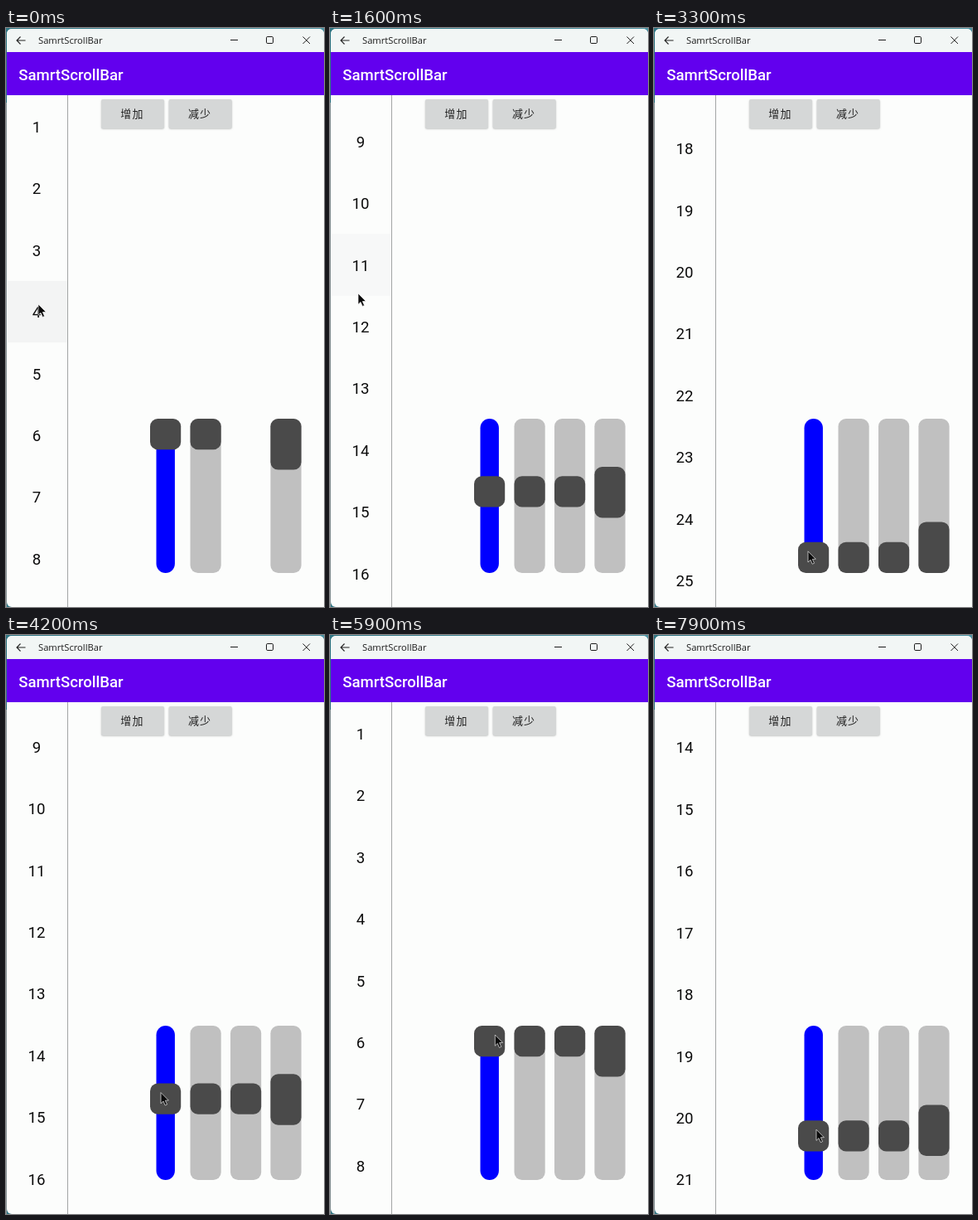
Write an HTML page with a canvas that moves like this. It is 384 px wide and 698 px high and loops after 8000 ms.

```html
<!DOCTYPE html>
<html lang="en">
<head>
<meta charset="utf-8">
<title>Scroll bars</title>
<style>
  html, body { margin: 0; width: 100%; height: 100%; overflow: hidden; background: #fcfdfc; }
  canvas { display: block; width: 384px; height: 698px; }
</style>
</head>
<body>
<canvas id="stage"></canvas>
<script>
const W = 384, H = 698, LOOP = 8000, STEP = 100;
const ROW = 74.43, LIST_TOP = 81.5, ROWS = 25, MAX_SCROLL = 1239;
const BAR_TOP = 471, BAR_H = 186;
const DARK = '#4a4a4a', GREY = '#c0c0c0';

const canvas = document.getElementById('stage');
const ratio = window.devicePixelRatio || 1;
canvas.width = W * ratio;
canvas.height = H * ratio;
const c = canvas.getContext('2d');

// Monotone cubic through [time, value] points: smooth, never overshoots
function curve(points) {
  const slopes = points.slice(1).map((p, i) => (p[1] - points[i][1]) / (p[0] - points[i][0]));
  const tangents = points.map((_, i) => {
    const a = slopes[i - 1], b = slopes[i];
    if (a === undefined) return b;
    if (b === undefined) return a;
    return a * b <= 0 ? 0 : 2 * a * b / (a + b);
  });
  return t => {
    let i = 0;
    while (i < points.length - 2 && t >= points[i + 1][0]) i++;
    const [t0, v0] = points[i], [t1, v1] = points[i + 1];
    const d = t1 - t0, u = (t - t0) / d, u2 = u * u, u3 = u2 * u;
    return v0 * (2 * u3 - 3 * u2 + 1) + v1 * (3 * u2 - 2 * u3)
      + d * (tangents[i] * (u3 - 2 * u2 + u) + tangents[i + 1] * (u3 - u2));
  };
}

const scrollAt = curve([[0, 0], [500, 0], [1600, 577.5], [2260, MAX_SCROLL], [3300, MAX_SCROLL],
  [4200, 579.5], [5100, 151], [5500, 0], [6400, 0], [6800, 174], [7900, 951], [8000, 1005]]);
const pointerX = curve([[0, 39], [1600, 34], [2600, 31], [2700, 31], [3300, 186],
  [4200, 187], [5100, 196], [6800, 201], [7900, 196], [8000, 196]]);
const pointerY = curve([[0, 333], [500, 333], [1600, 320], [2600, 226], [2700, 226], [3300, 631]]);
const GRAB = 3300, GRIP = 11;

// The third bar shows while scrolling and fades out when idle
function autoAlpha(t) {
  if (t >= GRAB) return 1;
  if (t < 500) return 0;
  return Math.max(0, Math.min(1, (2815 - t) / 250));
}

function rect(x, y, w, h, color) {
  c.fillStyle = color;
  c.fillRect(x, y, w, h);
}

function round(x, y, w, h, r, color) {
  c.fillStyle = color;
  c.beginPath();
  c.roundRect(x, y, w, h, r);
  c.fill();
}

function line(color, width, ...paths) {
  c.strokeStyle = color;
  c.lineWidth = width;
  c.beginPath();
  for (const p of paths) {
    c.moveTo(p[0], p[1]);
    for (let i = 2; i < p.length; i += 2) c.lineTo(p[i], p[i + 1]);
  }
  c.stroke();
}

function text(str, x, y, font, color, align = 'left') {
  c.font = font;
  c.fillStyle = color;
  c.textAlign = align;
  c.fillText(str, x, y);
}

function drawWindow() {
  const sky = c.createLinearGradient(0, 0, W, 0);
  sky.addColorStop(0, '#2f7583');
  sky.addColorStop(1, '#4b93a3');
  rect(0, 0, W, H, sky);
  rect(0, 90, 1, H, '#8b9699');
  round(1, 1, W - 1, H - 1, [6, 6, 0, 6], '#fcfdfc');
  round(1, 1, W - 1, 28, [6, 6, 0, 0], '#f2f6f5');
  line('#222', 1.1, [23.5, 15, 13, 15], [17.5, 10.5, 13, 15, 17.5, 19.5]);
  text('SamrtScrollBar', 39, 19, '11.2px "Open Sans", "Noto Sans", sans-serif', '#1c1c1c');
  line('#1c1c1c', 1, [271, 14.5, 280, 14.5], [358.5, 10.5, 367, 19], [367, 10.5, 358.5, 19]);
  c.beginPath();
  c.roundRect(314.5, 10.5, 8, 8, 1.3);
  c.stroke();
  rect(1, 29, W - 1, 52, '#6200ee');
  text('SamrtScrollBar', 15.3, 62.5, '500 18.6px Roboto, sans-serif', '#fff');
}

function drawButton(x, label) {
  c.save();
  c.shadowColor = 'rgba(0,0,0,.25)';
  c.shadowBlur = 2 * ratio;
  c.shadowOffsetY = 0.7 * ratio;
  round(x, 86, 76, 35, 2, '#d5d7d7');
  c.restore();
  [...label].forEach((ch, i) =>
    text(ch, x + 23.3 + i * 14.1, 108.4, '13px "Noto Sans CJK SC", "Noto Sans CJK", sans-serif', '#202020'));
}

function drawList(t, scroll, px, py) {
  c.save();
  c.beginPath();
  c.rect(1, 81, 73, H - 81);
  c.clip();
  for (let n = 0; n < ROWS; n++) {
    const top = LIST_TOP + n * ROW - scroll;
    if (top > H || top + ROW < 81) continue;
    if (px < 74 && py >= top && py < top + ROW)
      rect(2, top, 72, ROW, t <= 500 ? '#f3f4f4' : '#f7f8f8');
    text(n + 1, 37, top + 44.3, '18.6px Roboto, sans-serif', '#0c0c0c', 'center');
  }
  c.restore();
  rect(74, 81, 1, H - 81, '#a3a5a5');
}

function drawBar(x, thumbH, part) {
  round(x, BAR_TOP, 37.2, BAR_H, 9.3, GREY);
  drawThumb(x, thumbH, part);
}

function drawThumb(x, h, part) {
  round(x, BAR_TOP + part * (BAR_H - h), 37.2, h, 9.3, DARK);
}

function drawPointer(x, y) {
  c.save();
  c.translate(x, y);
  c.beginPath();
  [[0, 0], [0, 13.2], [3, 10.4], [5.2, 15.4], [7.5, 14.4], [5.3, 9.6], [9.3, 9.4]]
    .forEach(p => c.lineTo(...p));
  c.closePath();
  c.fillStyle = '#0a0a0a';
  c.fill();
  c.strokeStyle = 'rgba(255,255,255,.8)';
  c.lineWidth = 0.8;
  c.stroke();
  c.restore();
}

function draw(t) {
  const scroll = scrollAt(t), part = scroll / MAX_SCROLL;
  const px = pointerX(t);
  const py = t < GRAB ? pointerY(t) : BAR_TOP + part * 148.8 + GRIP;

  c.setTransform(ratio, 0, 0, ratio, 0, 0);
  drawWindow();
  drawList(t, scroll, px, py);
  drawButton(115, '增加');
  drawButton(196.7, '减少');

  round(181.5, BAR_TOP, 22.4, BAR_H, 11.2, '#0000ff');
  drawThumb(174, 37.2, part);
  drawBar(222.5, 37.2, part);
  c.globalAlpha = autoAlpha(t);
  drawBar(271, 37.2, part);
  c.globalAlpha = 1;
  drawBar(319.4, 61.6, part);
  drawPointer(px, py);
}

const start = performance.now();
function frame() {
  const t = (performance.now() - start) % LOOP;
  draw(Math.floor(t / STEP) * STEP);
  requestAnimationFrame(frame);
}
frame();
</script>
</body>
</html>
```
